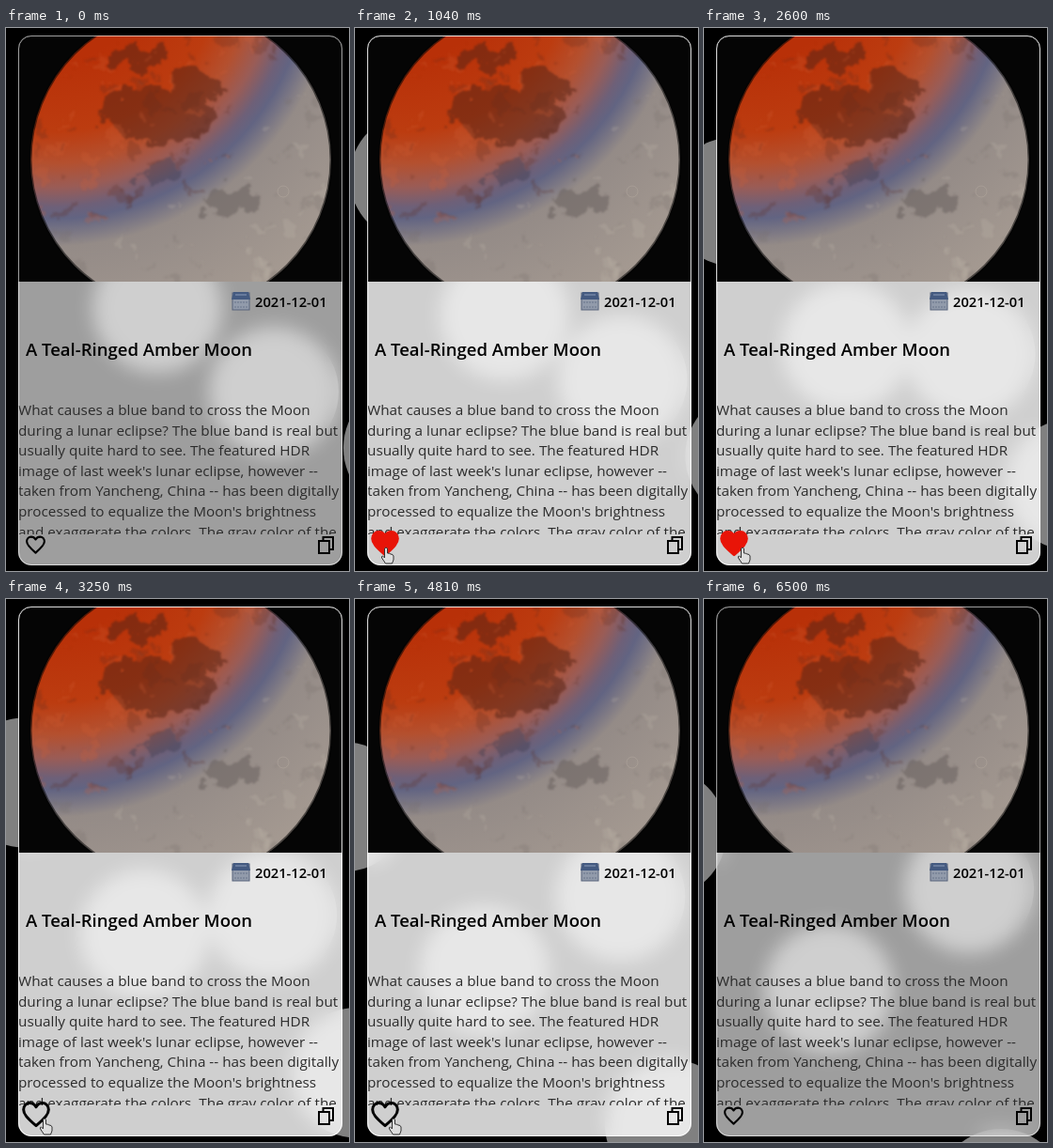
Animation, 365 px wide and 578 px high, one loop 6.63 s. Source, as an HTML page:

```html
<!DOCTYPE html>
<html lang="en">
<head>
<meta charset="utf-8">
<style>
  html, body { margin: 0; width: 100%; height: 100%; overflow: hidden; background: #000; }
  body { position: relative; font-family: "Open Sans", "Noto Sans", sans-serif; color: #000; }
  .orb { position: absolute; left: -69px; top: -69px; width: 138px; height: 138px; border-radius: 50%; background: #808080; }
  #card, #edge { position: absolute; left: 13px; top: 8px; width: 345px; height: 564px; border-radius: 14px; box-sizing: border-box; }
  #card { overflow: hidden; backdrop-filter: blur(10px); }
  #edge { border: 1px solid; }
  #photo { position: absolute; left: 0; top: 0; }
  .text { position: absolute; margin: 0; white-space: nowrap; }
  .date { left: 252px; top: 273px; font-size: 14.7px; font-weight: 600; line-height: 21px; }
  .title { left: 8px; top: 320px; font-size: 18.5px; font-weight: 600; line-height: 28px; }
  .body { left: 0; top: 388px; height: 143px; overflow: hidden; font-size: 15.3px; line-height: 21.6px; color: #2b2b2b; }
  #icons { position: absolute; left: 0; top: 0; }
</style>
</head>
<body>
<div id="orbs"></div>

<div id="card">
  <svg id="photo" width="345" height="262" viewBox="13 8 345 262">
    <defs>
      <radialGradient id="shadow" gradientUnits="userSpaceOnUse" cx="50" cy="-70" r="420">
        <stop offset=".25" stop-color="#b83008"/>
        <stop offset=".43" stop-color="#bc3c10"/>
        <stop offset=".51" stop-color="#b4502f"/>
        <stop offset=".57" stop-color="#9a5c56"/>
        <stop offset=".62" stop-color="#6e6078"/>
        <stop offset=".65" stop-color="#626482"/>
        <stop offset=".685" stop-color="#7b7784"/>
        <stop offset=".72" stop-color="#948b87"/>
        <stop offset="1" stop-color="#a69b92"/>
      </radialGradient>
      <filter id="rough" x="-20%" y="-20%" width="140%" height="140%" color-interpolation-filters="sRGB">
        <feTurbulence type="fractalNoise" baseFrequency=".05" numOctaves="4" seed="7"/>
        <feDisplacementMap in="SourceGraphic" scale="36" xChannelSelector="R" yChannelSelector="G"/>
        <feGaussianBlur stdDeviation=".8"/>
      </filter>
      <clipPath id="disc"><circle cx="186" cy="140" r="160"/></clipPath>
    </defs>
    <rect x="13" y="8" width="345" height="262" fill="#050505"/>
    <g clip-path="url(#disc)">
      <rect x="13" y="8" width="345" height="262" fill="url(#shadow)"/>
      <g filter="url(#rough)">
        <g fill="#5a2616" opacity=".55">
          <ellipse cx="160" cy="92" rx="62" ry="29"/>
          <ellipse cx="200" cy="62" rx="26" ry="22"/>
          <ellipse cx="142" cy="30" rx="34" ry="11"/>
        </g>
        <ellipse cx="165" cy="155" rx="27" ry="11" fill="#3e3c52" opacity=".4"/>
        <ellipse cx="236" cy="185" rx="30" ry="15" fill="#645c5a" opacity=".5"/>
        <g id="mottle"></g>
      </g>
      <circle cx="295" cy="174" r="6" fill="none" stroke="#b5aba2" opacity=".5"/>
    </g>
    <circle cx="186" cy="140" r="160" fill="none" stroke="#050505" stroke-width="3" opacity=".55"/>
  </svg>
  <p class="text date">2021-12-01</p>
  <p class="text title">A Teal-Ringed Amber Moon</p>
  <p class="text body">What causes a blue band to cross the Moon<br>during a lunar eclipse? The blue band is real but<br>usually quite hard to see. The featured HDR<br>image of last week's lunar eclipse, however --<br>taken from Yancheng, China -- has been digitally<br>processed to equalize the Moon's brightness<br>and exaggerate the colors. The gray color of the</p>
</div>
<div id="edge"></div>

<svg id="icons" width="365" height="578">
  <g transform="translate(240 280)">
    <rect x="1" y="2" width="18" height="18" fill="#929bab" stroke="#56627a"/>
    <path d="M0 9L2 1H18L20 9Z" fill="#445a80"/>
    <path d="M4 4h12" stroke="#8c9cb8"/>
    <path d="M3 12h14M3 17h14" stroke="#68748a" stroke-dasharray="2 1"/>
  </g>
  <path id="heart" stroke-width="2.1" stroke-linejoin="round"
    d="M0 8.6C-7 2.6-9.4-.2-9.4-3.5C-9.4-6.4-7.3-8.4-4.8-8.4C-2.8-8.4-1-7.3 0-5.5C1-7.3 2.8-8.4 4.8-8.4C7.3-8.4 9.4-6.4 9.4-3.5C9.4-.2 7 2.6 0 8.6Z"/>
  <path d="M333 546h11v13h-11zM337.500 546v-4h10.500v13h-4" fill="none" stroke="#000" stroke-width="2"/>
  <path id="hand" fill="#ddd" stroke="#333" stroke-linejoin="round"
    d="M-1.500 1Q0-1 1.500 1V6L3.500 6.300L5 7L7 7.500L8 9V13L6.500 17H-.5L-4.500 11Q-5 9-3.500 9L-1.500 11Z"/>
</svg>

<script>
const $ = id => document.getElementById(id);
const LOOP = 6630, STEP = 130;

// Moon surface: random patches, tinted by whether they lie in the shadow
let seed = 11;
const random = () => (seed = seed * 16807 % 2147483647) / 2147483647;
let mottle = "";
for (let i = 0; i < 130; i++) {
  const x = 30 + random() * 310, y = 10 + random() * 260, r = 1 + 7 * random() ** 2;
  const lit = Math.hypot(x - 50, y + 70) > 285;
  const fill = lit ? (i % 2 ? "#c0b6aa" : "#776e6a") : (i % 2 ? "#d06038" : "#5c2a1c");
  mottle += `<ellipse cx="${x}" cy="${y}" rx="${r * 1.6}" ry="${r}" fill="${fill}" opacity=".24"/>`;
}
$("mottle").innerHTML = mottle;

const linear = p => p;
const smooth = p => p * p * (3 - 2 * p);
const early = p => smooth(p ** .75);
const late = p => p ** 1.7;
const ramp = (t, from, to) => Math.min(1, Math.max(0, (t - from) / (to - from)));
const mix = (a, b, k) => a + (b - a) * k;

// Drifting discs: start, end and an easing for each axis
const orbs = [
  { from: [161, 298], to: [133, 415], ease: [smooth, smooth] },
  { from: [285, 387], to: [282, 308], ease: [early, early] },
  { from: [428, 447], to: [316, 633], ease: [smooth, late] },
  { from: [84, 142], to: [-45, 249], ease: [linear, linear] }
];
for (const orb of orbs) {
  orb.node = $("orbs").appendChild(document.createElement("div"));
  orb.node.className = "orb";
}

function draw() {
  const t = Math.floor(performance.now() % LOOP / STEP) * STEP;
  for (const { node, from, to, ease } of orbs) {
    const [x, y] = from.map((v, axis) => mix(v, to[axis], ease[axis](ramp(t, 0, 6500))));
    node.style.transform = `translate(${x}px,${y}px)`;
  }

  const hover = ramp(t, 130, 390) - ramp(t, 5980, 6240);
  $("card").style.background = `rgba(255,255,255,${mix(.62, .81, hover)})`;
  $("edge").style.borderColor = `rgba(255,255,255,${mix(.62, .87, hover)})`;

  const liked = t >= 1040 && t < 3250;
  const heart = $("heart");
  heart.setAttribute("transform", `translate(${mix(31.5, 32, hover)} ${mix(550, 548.5, hover)}) scale(${mix(1, 1.42, hover)})`);
  heart.setAttribute("fill", liked ? "#e81408" : "none");
  heart.setAttribute("stroke", liked ? "#e81408" : "#000");

  const raised = ramp(t, 130, 680) - ramp(t, 5590, 6110);
  $("hand").setAttribute("transform", `translate(${mix(33, 41, ramp(t, 1560, 2600))} ${mix(580, 553, raised)})`);
  requestAnimationFrame(draw);
}
draw();
</script>
</body>
</html>
```
